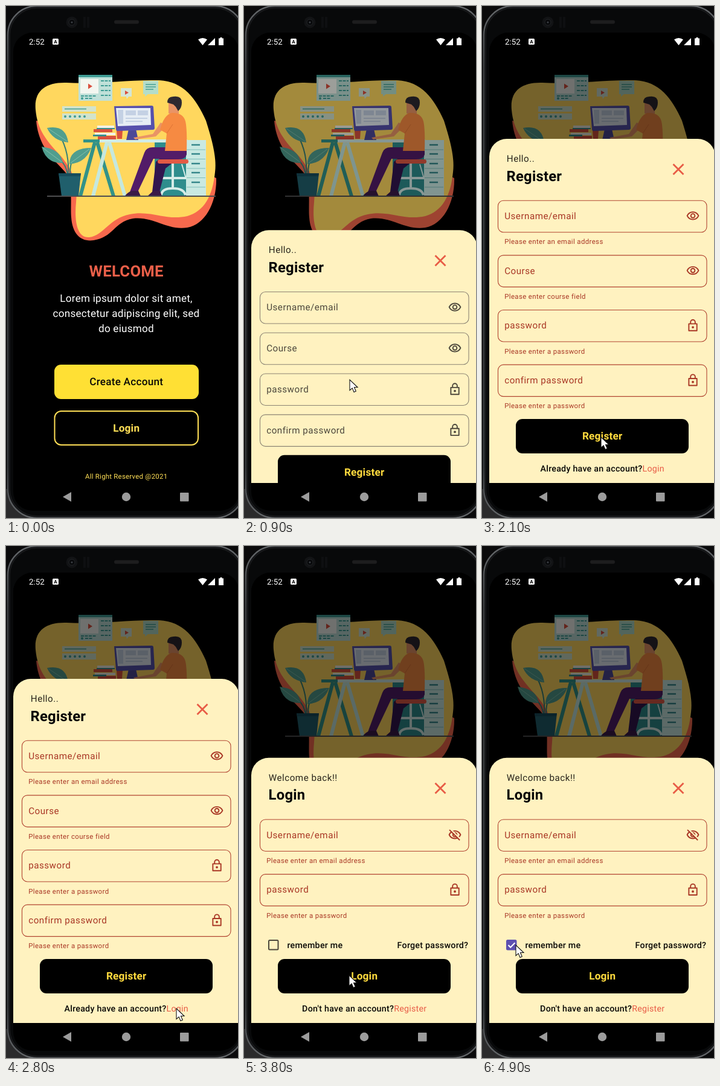
Write an HTML page that moves like this. It is 384 px wide and 848 px high and loops after 5000 ms.

```html
<!DOCTYPE html>
<html lang="en">
<head>
<meta charset="utf-8">
<title>Welcome, register and login</title>
<style>
  html, body { margin: 0; width: 100%; height: 100%; overflow: hidden; background: #000; }
  svg { display: block; width: 100%; height: 100%; }
  text { font-family: Roboto, sans-serif; fill: currentColor; text-rendering: geometricPrecision; }
  .mid { text-anchor: middle; }
  .line { fill: none; stroke: currentColor; }
  .field { color: #4d483c; }
  .field .box { fill: none; stroke: #8b8373; stroke-width: 1.1; }
  .field.bad { color: #a93725; }
  .field.bad .box { stroke: #b14431; }
</style>
</head>
<body>
<svg id="stage" viewBox="0 0 384 848" preserveAspectRatio="none">
  <defs>
    <clipPath id="view"><rect x="12" y="44" width="374" height="746"/></clipPath>
    <clipPath id="btn"><rect x="80" y="594" width="239" height="57" rx="11"/></clipPath>
    <linearGradient id="rim" x1="0" y1="0" x2="0" y2="1">
      <stop offset="0" stop-color="#64676a"/><stop offset=".12" stop-color="#3f4244"/>
      <stop offset=".9" stop-color="#3a3d40"/><stop offset="1" stop-color="#64676a"/>
    </linearGradient>
  </defs>

  <!-- phone -->
  <rect width="384" height="848" fill="#0a0a0b"/>
  <path d="M0 800V848H60Q20 842 5 800Z" fill="#2b2b2c"/>
  <rect x="3" y="0" width="391" height="848" rx="48" fill="#08090a" stroke="url(#rim)" stroke-width="2.500"/>
  <rect x="6" y="3" width="385" height="842" rx="45" fill="none" stroke="#18191b" stroke-width="2"/>
  <rect x="12" y="44" width="374" height="792" rx="32"/>
  <circle cx="109" cy="27" r="9.5" fill="#121315"/>
  <circle cx="109" cy="27" r="5" fill="#08090b" stroke="#232528"/>
  <circle cx="109" cy="27" r="1.6" fill="#3b3f44"/>
  <path d="M128 18h4v18h-4zM134 18h4v18h-4z" fill="#0e0f11"/>
  <rect x="179" y="23.500" width="41" height="6" rx="3" fill="#1d1d1e"/>

  <!-- welcome screen -->
  <g id="art">
    <path fill="#f7694d" d="M50 190C54 235 80 255 98 275C112 292 106 330 108 350C110 379 125 391 145 388C178 383 178 358 210 352C245 348 265 372 300 367C330 362 349 325 348 285L200 220Z"/>
    <path fill="#ffd75e" d="M49 172C46 140 66 126 100 127C150 130 200 122 250 123C292 123 314 152 331 190C341 222 349 250 346 275C342 315 328 340 300 348C265 356 240 338 205 345C170 352 162 380 138 383C117 385 113 355 116 325C119 292 110 272 92 250C66 222 52 205 49 172Z"/>
    <!-- floating cards -->
    <rect x="120" y="114" width="56" height="43" fill="#bfe0d8"/>
    <path fill="#3f9c94" d="M120 114h56v4h-56z"/>
    <path fill="#f3f6f0" d="M123 121h30v24h-30z"/>
    <path fill="#d94f3e" d="M136 128.500l7 4.500l-7 4.500z"/>
    <path class="line" color="#3f9c94" stroke-width="2" stroke-dasharray="5 1.500" d="M157 124h16M157 132h16M157 140h16M157 148h16M124 149h26M131 153h13"/>
    <circle cx="126" cy="153" r="2" fill="#3f9c94"/>
    <path fill="#d4e6d6" d="M190 136h18v14h-5l-3 4l-1-4h-9z"/>
    <path fill="#d94f3e" d="M197 140l6 3.500l-6 3.500z"/>
    <path fill="#b4ddca" d="M227 124h25v22h-17l-5 4v-4h-3z"/>
    <path class="line" color="#459f94" stroke-width="1.5" d="M231 130h17M231 134h17M231 138h13"/>
    <path fill="#d2e3cc" d="M93 166h56v9H93zM93 178h56v10H93z"/>
    <path class="line" color="#3f9c94" stroke-width="1.5" d="M97 170.500h36"/>
    <path class="line" color="#3f9c94" stroke-width="4" stroke-linecap="round" stroke-dasharray="0 8" d="M98 183h34"/>
    <!-- cabinet and trestles -->
    <path fill="#2e8d8d" d="M246 226h55v89h-55z"/>
    <path fill="#c9e9e2" d="M298 222h33v93h-33z"/>
    <path class="line" color="#7fbdb9" d="M299 238h31M299 253.500h31M299 269h31M299 284.500h31M299 300h31"/>
    <path class="line" color="#35868a" stroke-width="2.500" d="M307 230h14M307 245h14M307 261h14M307 276h14M307 292h14"/>
    <path class="line" color="#329288" stroke-width="6" d="M147 226L123 315M151 226L178 315"/>
    <path class="line" color="#c5e8df" stroke-width="6" d="M167 226L144 315M171 226L197 315"/>
    <path fill="#d2ece6" d="M128 221h172v5H128z"/>
    <path fill="#329288" d="M128 221h27v5h-27z"/>
    <!-- books, cup, monitor -->
    <path fill="#d9513e" d="M145 204h31v5h-31zM152 215h30v6h-30z"/>
    <path fill="#f3f1e6" d="M151 198h28v5h-28zM147 210h34v4h-34z"/>
    <path fill="#398d8c" d="M150 202h30v2h-30zM144 213h22v3h-22z"/>
    <path fill="#d9513e" d="M183 206h10l-1 14h-8z"/>
    <path fill="#4d4897" d="M203 204h12l4 18h-20z"/>
    <path fill="#5650ac" d="M179 166l62-1q3 0 3 3l2 34q0 3-3 3l-58 2q-3 0-3-3z"/>
    <path fill="#e6edf4" d="M182 169h57l1 28l-55 2z"/>
    <path fill="#c4d1e4" d="M185 172h9v23h-8zM198 173h17v8h-17zM218 173h17v8h-17zM198 185h36v2h-36zM198 190h28v2h-28z"/>
    <!-- stool -->
    <path class="line" color="#d6ece8" stroke-width="4" d="M276 261v42M257 313q1-11 19-11t21 11M256 285h42"/>
    <path class="line" color="#d6ece8" stroke-width="2" d="M264 262l-8 24M291 262l7 24"/>
    <!-- person -->
    <path fill="#32164f" d="M262 247h30l-28 22l-10 39h-12l6-50z"/>
    <path fill="#521c68" d="M299 234v12q-2 8-14 8l-41-1l-26 55h-13l24-65q3-9 14-9z"/>
    <path fill="#3b1b48" d="M208 306h11l4 9h-26q2-5 11-9zM244 306h11l3 9h-24z"/>
    <rect x="251" y="254" width="51" height="7" rx="3.500" fill="#e25a45"/>
    <path fill="#e99466" d="M269 160h17v20l-11 4l-2-6h-4zM266 198l-18 18l-34 5l-3-3l32-6l13-19z"/>
    <path fill="#f68a42" d="M274 177q19-1 23 14q3 13 2 49h-36l3-29l-11-6q6-24 19-28z"/>
    <path class="line" color="#de7335" d="M266 211l10-15"/>
    <path fill="#2d2830" d="M267 160q0-10 10-10q14-2 14 10q0 9-6 14l-4-7l-4-4z"/>
    <!-- plant -->
    <path class="line" color="#357f76" stroke-width="2" d="M103 279Q105 246 92 220M106 279Q106 250 120 244M102 279Q98 256 79 248"/>
    <path fill="#509e8e" d="M68 202Q99 196 103 226Q77 223 68 202ZM59 233Q91 237 94 260Q66 261 59 233ZM105 262Q105 235 141 235Q132 260 105 262Z"/>
    <path class="line" color="#83c0ad" d="M70 203L101 224M61 235L92 258M107 260L138 237"/>
    <path fill="#205f6c" d="M87 277h37l-4 38H92z"/>
    <path fill="#174d5c" d="M87 277h37l-1 5H88z"/>
    <path class="line" color="#4e4e50" stroke-width="2" d="M68 315H347"/>
    <g id="welcome"></g>
  </g>
  <rect id="dim" x="12" y="44" width="374" height="746" rx="32"/>

  <g id="sheets" clip-path="url(#view)"></g>

  <!-- system bars -->
  <g id="bars" fill="#fff" color="#fff">
    <rect x="77" y="54" width="10" height="10" rx="1.500"/>
    <path d="M318 55.500q7.500-5 15 0L325.500 65zM346 53v12h-12zM354.500 52h3v1.500h2.500V65h-8V53.500h2.500z"/>
    <g fill="#9c9c9c"><path d="M94 813l14-8v16z"/><circle cx="199" cy="813" r="7.200"/><rect x="288" y="806" width="14.500" height="14.500" rx="1"/></g>
  </g>
  <path id="cursor" d="M0 0V17.500L4.200 13.800L7 20.500L10.300 19L7.500 12.500H13Z" fill="#fff" stroke="#111" stroke-width="1.1"/>
</svg>
<script>
const DP = 0.952, LOOP = 5000, STEP = 100;
const $ = id => document.getElementById(id);

function add(parent, tag, attrs = {}) {
  const el = document.createElementNS('http://www.w3.org/2000/svg', tag);
  for (const k in attrs) el.setAttribute(k, attrs[k]);
  parent.appendChild(el);
  return el;
}

// size and letter gap are in device units
function label(parent, str, x, y, size, opt = {}) {
  const { gap = 0.25, weight = 400, color, mid } = opt;
  const el = add(parent, 'text', { x, y, 'font-size': size * DP, 'font-weight': weight, 'letter-spacing': gap * DP });
  if (color) el.setAttribute('color', color);
  if (mid) el.setAttribute('class', 'mid');
  el.textContent = str;
  return el;
}

// Welcome screen
const home = $('welcome'), YELLOW = '#ffdf56', RED = '#e85c46';
label(home, 'WELCOME', 199.2, 448, 27, { weight: 700, color: '#ea5f49', mid: true });
['Lorem ipsum dolor sit amet,', 'consectetur adipiscing elit, sed', 'do eiusmod'].forEach((s, i) =>
  label(home, s, 199, 490 + i * 24.9, 18, { color: '#fff', mid: true }));
const create = add(home, 'rect', { x: 80, y: 594, width: 239, height: 57, rx: 11 });
const ripple = add(home, 'circle', { cx: 177, cy: 613, fill: '#c4bb92', 'clip-path': 'url(#btn)' });
label(home, 'Create Account', 199.2, 628.3, 18, { weight: 500, color: '#0c0a05', mid: true });
add(home, 'rect', { x: 80.5, y: 671, width: 237.5, height: 56, rx: 11, class: 'line', color: YELLOW, 'stroke-width': 2 });
label(home, 'Login', 199.2, 705, 18, { weight: 700, color: YELLOW, mid: true });
label(home, 'All Right Reserved @2021', 199.2, 783.3, 12, { color: YELLOW, mid: true });
label($('bars'), '2:52', 38, 64, 14, { gap: 0 });
label($('bars'), 'A', 82, 62, 8.5, { gap: 0, weight: 700, color: '#000', mid: true });

// Sheets
const PAPER = '#fff2c0', PITCH = 67.8, ERR = 22.85, END = 669.5;
const EYE = 'M2.1 11.500C4 7.400 7.700 5 12 5s8 2.400 9.900 6.500C20 15.600 16.300 18 12 18S4 15.600 2.100 11.500ZM8.500 11.500a3.500 3.500 0 1 0 7 0a3.500 3.500 0 1 0-7 0';
const LOCK = 'M5 9h14v12H5zM8 9V6a4 4 0 0 1 8 0v3';

function icon(parent, kind) {
  const g = add(parent, 'g', { transform: `translate(337.600 14.800) scale(${DP})` });
  const line = (d, extra) => add(g, 'path', { d, class: 'line', 'stroke-width': 2, ...extra });
  line(kind === 'lock' ? LOCK : EYE, { 'stroke-linejoin': 'round' });
  if (kind === 'lock') add(g, 'circle', { cx: 12, cy: 15, r: 2, fill: 'currentColor' });
  if (kind === 'off') {
    line('M4.500 2L22 19.500', { color: PAPER, 'stroke-width': 2.4 });
    line('M2.500 3L20.500 21');
  }
}

function makeSheet(o) {
  const root = add($('sheets'), 'g');
  const paper = add(root, 'rect', { x: 12, width: 374, height: 620, rx: 29, fill: PAPER });
  const head = add(root, 'g');
  label(head, o.hello, 40.8, 38.2, 16, { gap: 0.5, color: '#2a261c' });
  label(head, o.title, 40.6, 69.6, 25, { weight: 700, color: '#050505' });
  add(head, 'path', { d: 'M316.500 42l17 17M333.500 42l-17 17', class: 'line', color: RED, 'stroke-width': 2.8 });
  const fields = o.fields.map(([name, kind, msg]) => {
    const g = add(root, 'g');
    add(g, 'rect', { x: 26.5, y: 0.5, width: 345.5, height: 52.5, rx: 9, class: 'box' });
    label(g, name, 37.2, 31.3, 16, { gap: 0.5 });
    icon(g, kind);
    return { g, msg: label(g, msg, 37.2, 72.6, 12, { gap: 0.4 }) };
  });
  add(root, 'rect', { x: 56, y: 684, width: 286, height: 57, rx: 11 });
  label(root, o.title, 199.2, 718.3, 18, { weight: 700, color: '#ffdb3e', mid: true });
  const foot = label(root, '', 199.2, 771, 15, { mid: true });
  add(foot, 'tspan', { 'font-weight': 500, fill: '#090805' }).textContent = o.ask;
  add(foot, 'tspan', { fill: RED }).textContent = o.link;

  function place(shown, err) {
    root.style.display = shown > 0 ? '' : 'none';
    const pitch = PITCH + (err > 0 ? ERR : 0);
    const first = o.end - fields.length * pitch + PITCH - 53;
    const top = first - 101.7;
    root.setAttribute('transform', `translate(0 ${(1 - shown) * (790 - top)})`);
    paper.setAttribute('y', top);
    head.setAttribute('transform', `translate(0 ${top})`);
    fields.forEach((f, i) => {
      f.g.setAttribute('transform', `translate(0 ${first + i * pitch})`);
      f.g.setAttribute('class', err > 0 ? 'field bad' : 'field');
      f.msg.style.opacity = err;
    });
  }
  return { root, place };
}

const MAIL = 'Please enter an email address', PASS = 'Please enter a password';
const register = makeSheet({
  hello: 'Hello..', title: 'Register', ask: 'Already have an account?', link: 'Login', end: END,
  fields: [['Username/email', 'eye', MAIL], ['Course', 'eye', 'Please enter course field'],
           ['password', 'lock', PASS], ['confirm password', 'lock', PASS]]
});
const login = makeSheet({
  hello: 'Welcome back!!', title: 'Login', ask: "Don't have an account?", link: 'Register', end: 619,
  fields: [['Username/email', 'off', MAIL], ['password', 'lock', PASS]]
});
const box = add(login.root, 'rect', { x: 41, y: 653, width: 15.5, height: 15.5, rx: 1.5, 'stroke-width': 2 });
const tick = add(login.root, 'path', { d: 'M43.500 661l3.700 3.700l7.200-7.500', class: 'line', color: '#fff', 'stroke-width': 2 });
label(login.root, 'remember me', 71.4, 666.3, 15, { weight: 500, color: '#0b0a06' });
label(login.root, 'Forget password?', 253.6, 666.3, 15, { weight: 500, color: '#0b0a06' });

// Motion
const PATH = [ // time, x, y
  [100, 330, 850], [300, 252, 700], [600, 175, 619], [1000, 175, 619], [1600, 197, 714],
  [2300, 197, 714], [2700, 282, 766], [2900, 282, 766], [3100, 221, 730], [3500, 174, 711],
  [4200, 174, 711], [4700, 56, 661], [5000, 56, 661]
];
const ramp = (t, a, b) => Math.min(1, Math.max(0, (t - a) / (b - a)));
const rise = (t, a, b) => 1 - (1 - ramp(t, a, b)) ** 3;
const smooth = p => p * p * (3 - 2 * p);

function pointer(t) {
  const i = Math.max(1, PATH.findIndex(k => k[0] > t));
  const [a, x, y] = PATH[i - 1], [b, u, v] = PATH[i];
  const p = smooth(ramp(t, a, b));
  return [x + (u - x) * p, y + (v - y) * p];
}

function draw(t) {
  const [x, y] = pointer(t);
  $('cursor').setAttribute('transform', `translate(${x} ${y})`);
  $('cursor').style.display = t < 100 ? 'none' : '';

  create.setAttribute('fill', t >= 600 && t < 1100 ? '#ffda3d' : '#ffe034');
  const wave = ramp(t, 600, 900);
  ripple.setAttribute('r', 45 * wave);
  ripple.style.opacity = t > 600 && t < 1000 ? 0.6 * (1 - wave * 0.6) : 0;

  $('dim').style.opacity = 0.54 * ramp(t, 700, 1000);

  register.place(rise(t, 700, 1100) - rise(t, 2800, 3000), ramp(t, 1800, 2000));
  login.place(rise(t, 2800, 3100), ramp(t, 3500, 3700));

  const on = t >= 4900;
  box.setAttribute('fill', on ? '#5d50b0' : 'none');
  box.setAttribute('stroke', on ? '#5d50b0' : '#4d483c');
  tick.style.display = on ? '' : 'none';
}

const start = performance.now();
function loop() {
  const t = (performance.now() - start) % LOOP;
  draw(Math.floor(t / STEP) * STEP);
  requestAnimationFrame(loop);
}
loop();
</script>
</body>
</html>
```
